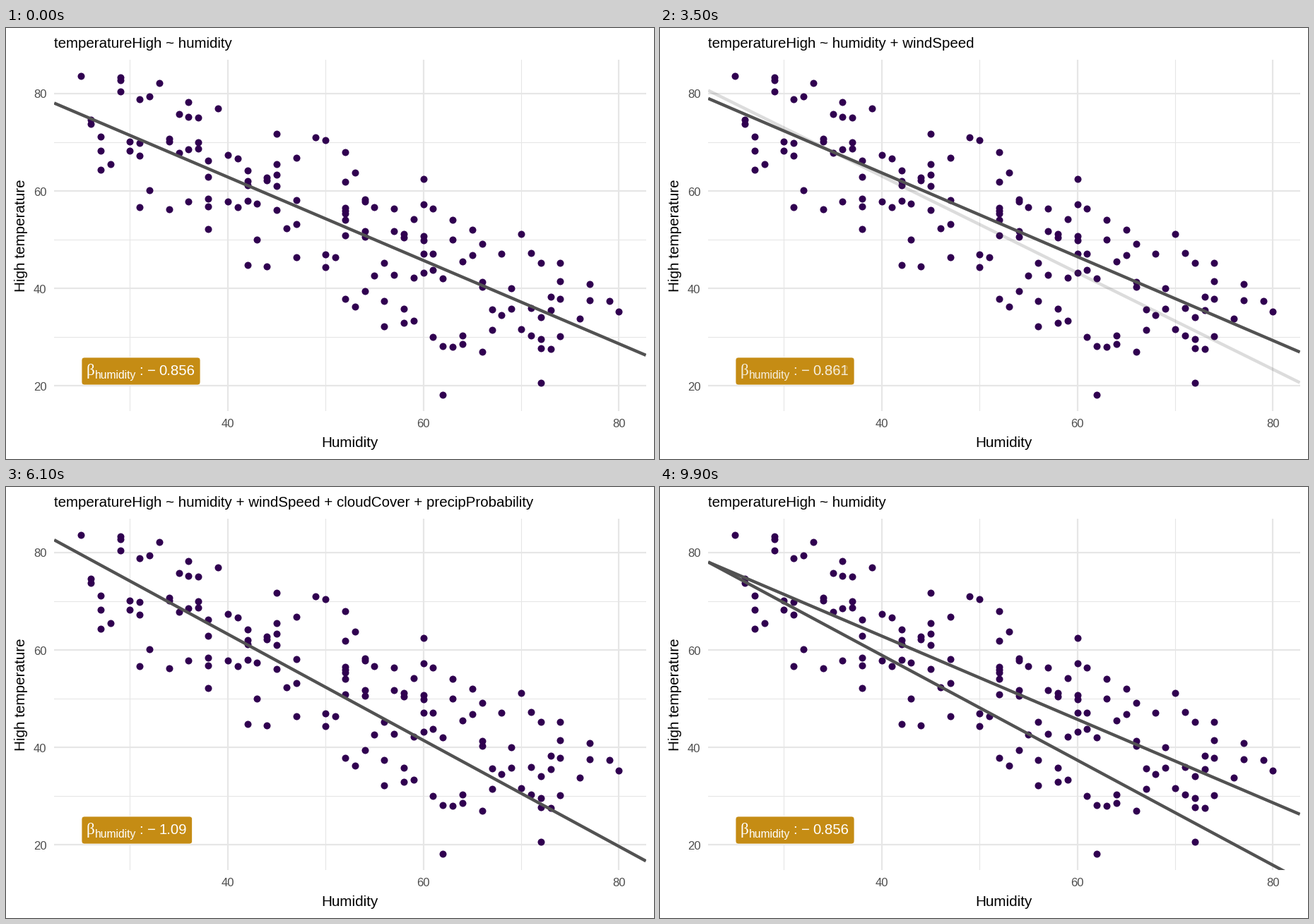
A matplotlib script that plays this animation: 917x611 px, repeating every 10 s.

```python
import matplotlib.pyplot as plt
from matplotlib.animation import FuncAnimation
from matplotlib.patches import FancyBboxPatch
from matplotlib.transforms import Affine2D

W, H, DPI = 917, 611, 64
LEFT, RIGHT, TOP, BOTTOM = 68.2, 905.5, 45, 543
XLIM, YLIM = (22.25, 82.75), (14.8, 86.95)
PURPLE, GREY, GRID, GOLD = "#300050", "#525252", "#e6e6e6", "#c58c14"

# High temperatures for each humidity value, from 25 upwards
TEMPS = [
    (83.6,), (74.6, 73.8), (71.2, 68.3, 64.4), (65.5,), (83.3, 82.8, 80.5),
    (70.1, 68.2), (78.8, 69.8, 67.2, 56.7), (79.4, 60.1), (82.1,),
    (70.7, 70.2, 56.3), (75.8, 67.8), (78.2, 75.2, 68.5, 57.9),
    (75.1, 70, 68.7), (66.2, 62.9, 58.4, 56.8, 52.2), (76.9,), (67.4, 57.8),
    (66.7, 56.7), (64.2, 62, 61.2, 58, 44.8), (57.4, 50), (62.8, 62.2, 44.5),
    (71.8, 65.5, 63.3, 61, 56.1), (52.3,), (66.8, 58.1, 53.2, 46.4), (),
    (71,), (70.4, 47, 44.3), (46.4,),
    (67.9, 61.9, 56.5, 55.9, 55.4, 54.1, 50.9, 37.8), (63.7, 36.3),
    (58.2, 57.8, 51.8, 50.6, 39.4), (56.6, 42.6), (45.2, 37.4, 32.2),
    (56.4, 51.8, 42.8), (51.1, 50.5, 35.8, 32.9), (54.2, 42.2, 33.3),
    (62.5, 57.2, 50.7, 49.8, 47.1, 43.2), (56.4, 47.1, 43.8, 30),
    (42, 28.1, 18.1), (54, 50, 28), (45.5, 30.3, 28.6), (52.1, 46.8),
    (49.2, 41.3, 40.3, 26.9), (35.6, 31.4), (47.1, 34.5), (40, 35.8),
    (51.2, 31.6), (47.3, 36, 30.3), (45.2, 34, 29.6, 27.7, 20.6),
    (38.2, 35.5, 27.6), (45.2, 41.4, 37.8, 30.1), (), (33.8,), (40.9, 37.5),
    (), (37.4,), (35.2,),
]

TERMS = ["humidity", "windSpeed", "cloudCover", "precipProbability", "visibility"]
TITLES = ["temperatureHigh ~ " + " + ".join(TERMS[:k + 1]) for k in range(5)]
SLOPES = ["0.856", "0.861", "0.992", "1.09", "1.078"]
STARTS = [78.05, 79, 80.65, 82.6, 78.05]  # fitted value at the left edge
FADES = [(15, 5), (35, 5), (55, 6), (75, 5), (94, 6)]  # first frame, length


def pt(px):
    return px * 72 / DPI


plt.rcParams["font.family"] = "Liberation Sans"
fig = plt.figure(figsize=(W / DPI, H / DPI), dpi=DPI, facecolor="white")
pixels = Affine2D().scale(1 / W, -1 / H).translate(0, 1) + fig.transFigure


def write(x, y, text, size, color="black", **kw):
    kw.setdefault("va", "baseline")
    return fig.text(x, y, text, fontsize=pt(size), color=color,
                    transform=pixels, **kw)


class Label:
    def __init__(self, z):
        self.box = FancyBboxPatch(
            (107, 467), 168, 39, boxstyle="round,pad=0,rounding_size=4",
            fc=GOLD, ec="white", lw=pt(0.8), transform=pixels, zorder=z)
        fig.add_artist(self.box)
        style = dict(color="white", zorder=z)
        self.value = write(216, 492, "", 20.4, **style)
        self.parts = [
            self.box, self.value,
            write(113.5, 492, "β", 23, family="Liberation Serif", **style),
            write(126, 496.5, "humidity", 15.6, **style),
            write(188.5, 492, ":", 20.4, **style),
            write(200, 492, "\u2212", 20.4, **style),
        ]

    def show(self, state, alpha):
        self.value.set_text(SLOPES[state])
        self.box.set_width(111 + 11.4 * len(SLOPES[state]))
        for part in self.parts:
            part.set_alpha(alpha)


ax = fig.add_axes([LEFT / W, 1 - BOTTOM / H, (RIGHT - LEFT) / W, (BOTTOM - TOP) / H])
ax.set(xlim=XLIM, ylim=YLIM)
ax.axis("off")

for v in (30, 50, 70):
    ax.axvline(v, color=GRID, lw=pt(1.1), zorder=0)
    ax.axhline(v, color=GRID, lw=pt(1.1), zorder=0)
for v in (20, 40, 60, 80):
    ax.axhline(v, color=GRID, lw=pt(2.2), zorder=0)
    y = BOTTOM - (v - YLIM[0]) / (YLIM[1] - YLIM[0]) * (BOTTOM - TOP)
    write(57.5, y + 6.5, v, 16.6, "#4d4d4d", ha="right")
    if v > 20:
        ax.axvline(v, color=GRID, lw=pt(2.2), zorder=0)
        x = LEFT + (v - XLIM[0]) / (XLIM[1] - XLIM[0]) * (RIGHT - LEFT)
        write(x, 566.5, v, 16.6, "#4d4d4d", ha="center")

points = [(x, t) for x, col in enumerate(TEMPS, 25) for t in col]
ax.plot(*zip(*points), "o", color=PURPLE, ms=pt(10), mew=0, zorder=2)
fits = [ax.plot([], [], color=GREY, lw=pt(4.4), solid_capstyle="butt", zorder=3)[0]
        for _ in range(2)]
labels = [Label(2), Label(3)]

title = write(68, 28, "", 20.5)
write(486.8, 594, "Humidity", 20.6, ha="center")
write(27, 294, "High temperature", 20.6, ha="center", rotation=90,
      rotation_mode="anchor")


def phase(i):
    """Current state and how far the next one has faded in."""
    for state, (start, n) in enumerate(FADES):
        if i < start + n:
            return state, max(0, i - start + 1) / n


def draw(i):
    old, fade = phase(i)
    new = (old + 1) % len(TITLES)
    title.set_text(TITLES[new if fade >= 0.5 else old])
    for fit, label, state, alpha in zip(fits, labels, (old, new), (1, fade)):
        drop = float(SLOPES[state]) * (XLIM[1] - XLIM[0])
        fit.set_data(XLIM, (STARTS[state], STARTS[state] - drop))
        fit.set_alpha(alpha)
        label.show(state, alpha)
    return [title, *fits]


anim = FuncAnimation(fig, draw, frames=100, interval=100, repeat=True,
                     repeat_delay=0, blit=False)
plt.show()
```
